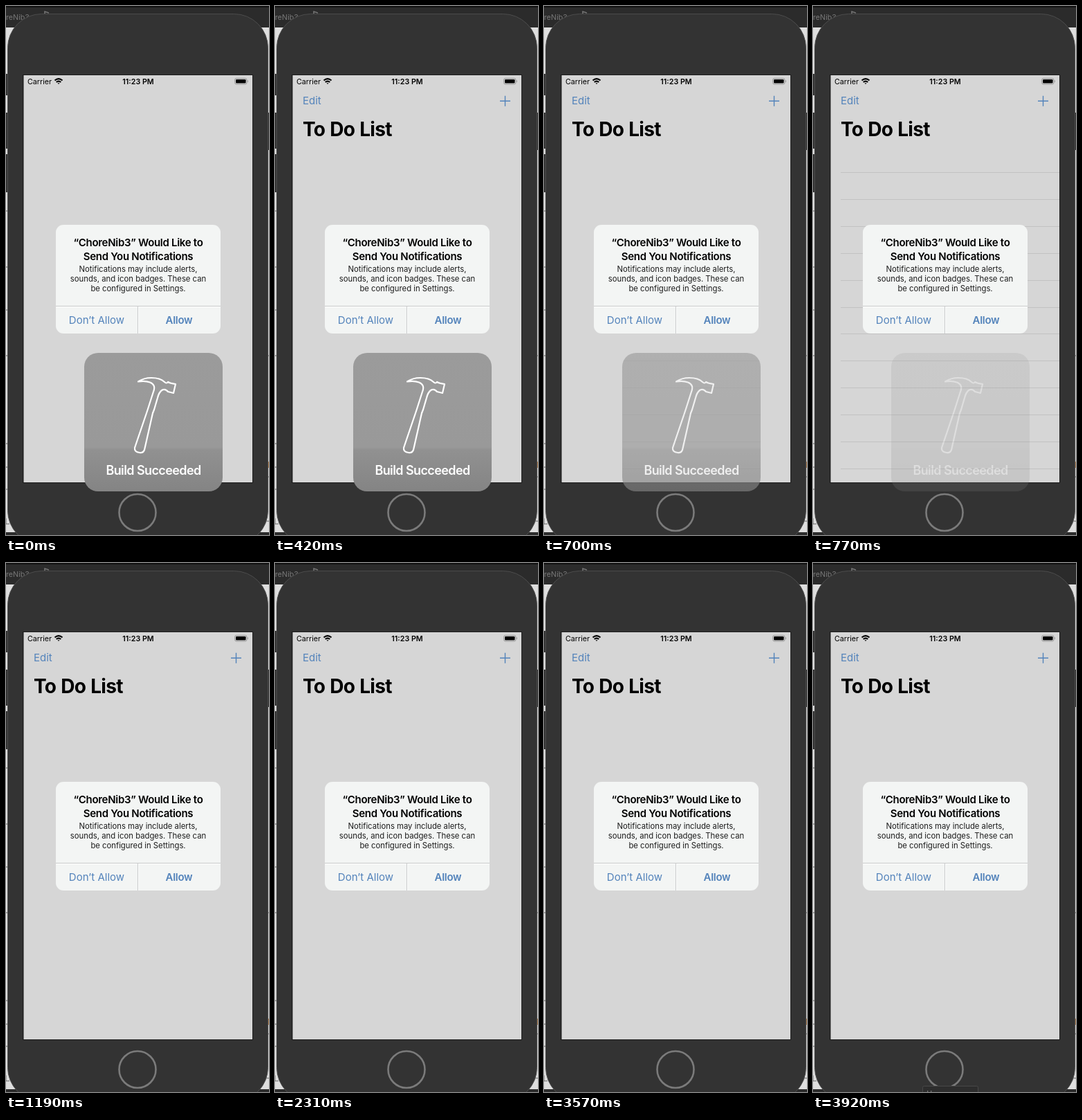
Recreate the animation shown at these times as an HTML page. Size 380x764 px, loop 3.99 s.

```html
<!DOCTYPE html>
<html lang="en">
<head>
<meta charset="utf-8">
<title>Notification prompt</title>
<style>
  html, body { margin: 0; width: 100%; height: 100%; overflow: hidden; background: #2b2b2b; }
  svg { display: block; width: 380px; height: 764px; }
  text { font: 15px Inter, Roboto, sans-serif; font-optical-sizing: none; letter-spacing: 0; }
  .mid { text-anchor: middle; }
  .bold { font-weight: 600; letter-spacing: -.3px; }
  .small { font-size: 11.3px; fill: #1c1c1c; }
  .status { font-size: 10.7px; letter-spacing: 0; }
  .link { fill: #5383bb; }
  .title { font-size: 28px; font-weight: 700; letter-spacing: -.7px; word-spacing: 1px; }
  .hud { font-size: 18px; font-weight: 600; letter-spacing: -.6px; fill: #fff; }
</style>
</head>
<body>
<svg viewBox="0 0 380 764">
  <defs>
    <linearGradient id="smoke" x1="0" y1="0" x2="0" y2="1">
      <stop offset="0" stop-color="#9b9b9b"/>
      <stop offset=".68" stop-color="#999"/>
      <stop offset=".7" stop-color="#919191"/>
      <stop offset="1" stop-color="#848484"/>
    </linearGradient>
    <clipPath id="hudArea"><rect x="113" y="501" width="200" height="187" rx="20"/></clipPath>
  </defs>

  <!-- desktop behind the phone -->
  <rect width="380" height="764" fill="#2b2b2b"/>
  <rect width="380" height="2" fill="#111"/>
  <text class="status" x="0" y="20" fill="#777">reNib3</text>
  <path d="M56 13V8l6 2" fill="none" stroke="#777" stroke-width="1.5"/>
  <rect y="31" width="380" height="729" fill="#dedede"/>
  <path d="M0 98h4v31H0zM0 154h4v52H0zM0 214h4v55H0zM376 154h4v54h-4z" fill="#333"/>
  <path d="M0 296h2m-2 81h2m-2 62h2m-2 66h2m-2 127h2m-2 34h2m-2 32h2M0 740v8h5M378 505h2m-2 175h2m-4 64h4" fill="none" stroke="#666"/>
  <path d="M378 658h2v9h-2z" fill="#b98a5a"/>

  <!-- phone -->
  <rect x="2.5" y="11.5" width="376" height="766" rx="49" fill="#333" stroke="#4c4c4c"/>
  <rect x="24" y="99" width="333" height="590" fill="#1c1c1c"/>
  <rect x="25.5" y="100" width="330.5" height="588" fill="#d6d6d6"/>
  <circle cx="190" cy="731.5" r="26.5" fill="#333" stroke="#7b7b7b" stroke-width="2.6"/>

  <!-- status bar -->
  <text class="status" x="31" y="113">Carrier</text>
  <g fill="none" stroke="#000" stroke-width="2">
    <path d="M70.5 107.5q5.5-4.8 11 0M72.7 110q3.3-2.8 6.6 0"/>
    <path d="M74.5 111.2h3L76 113z" fill="#000" stroke="none"/>
  </g>
  <text class="status bold mid" x="191" y="113">11:23 PM</text>
  <rect x="330.5" y="104.5" width="17.5" height="8.5" rx="2.5" fill="none" stroke="#999"/>
  <rect x="332" y="106" width="14.5" height="5.5" rx="1.3"/>
  <path d="M349 107q2 1.7 0 3.4z" fill="#999"/>

  <g id="page">
    <text class="link" x="40" y="142">Edit</text>
    <path d="M325 137.2h15M332.5 129.7v15" stroke="#5383bb" stroke-width="1.4"/>
    <text class="title" x="40" y="188">To Do List</text>
  </g>
  <path id="rows" fill="none" stroke="#c2c2c2"/>

  <!-- prompt -->
  <rect x="72" y="316" width="238" height="157" rx="11" fill="#f3f5f4"/>
  <path d="M72 433.5h238M190.5 433.5v39.5" stroke="#c8caca"/>
  <path d="M72 434.5h118M192 434.5h118M191.5 434v39" stroke="#fff"/>
  <g class="mid">
    <text class="bold" x="191" y="347">“ChoreNib3” Would Like to</text>
    <text class="bold" x="191" y="367">Send You Notifications</text>
    <text class="small" x="191" y="384">Notifications may include alerts,</text>
    <text class="small" x="191" y="398">sounds, and icon badges. These can</text>
    <text class="small" x="191" y="412">be configured in Settings.</text>
    <text class="link" x="131" y="459">Don’t Allow</text>
    <text class="link bold" x="250" y="459">Allow</text>
  </g>

  <g id="hud">
    <rect x="113" y="501" width="200" height="200" rx="20" fill="url(#smoke)"/>
    <path d="M191 542.5Q199 537 210 537Q223 537 229 543Q232 546 234 543Q237 545 245 546L242 559L234 557Q230 552 225 555Q221 558 219 566L214 583L212 588L200 641Q198 646 193 645Q185 644 186 638L203 588L205 582L213 557Q217 547 208 543.5Q201 541 191 542.5Z"
      fill="none" stroke="#fff" stroke-width="2.2" stroke-linejoin="round"/>
    <text class="hud mid" x="213" y="677">Build Succeeded</text>
  </g>

  <g id="tip">
    <rect x="158.5" y="755.5" width="80" height="14" rx="2" fill="#2d2d2d" stroke="#484848"/>
    <text class="status mid" x="198" y="770" fill="#888">Home screen</text>
  </g>
</svg>
<script>
  const LOOP = 3990, STEP = 70;
  const [page, rows, hud, tip] = ['page', 'rows', 'hud', 'tip'].map(id => document.getElementById(id));
  const fade = (el, amount) => el.setAttribute('opacity', Math.max(0, Math.min(1, amount)));

  rows.setAttribute('d', Array.from({ length: 12 }, (_, i) =>
    `M40 ${Math.round(240 + i * 38.9) + .5}H356`).join(''));

  function draw(now) {
    const t = Math.floor(now % LOOP / STEP) * STEP;
    fade(page, t / 210);
    fade(hud, t < 700 ? 1 : t < 770 ? .65 : t < 840 ? .2 : t < 910 ? .05 : 0);
    // the rows show through the fading panel first
    fade(rows, t < 700 || t >= 910 ? 0 : t < 770 ? .7 : 1);
    rows.setAttribute('clip-path', t < 770 ? 'url(#hudArea)' : 'none');
    fade(tip, (t - 3710) / 210);
    requestAnimationFrame(draw);
  }
  draw(performance.now());
</script>
</body>
</html>
```
